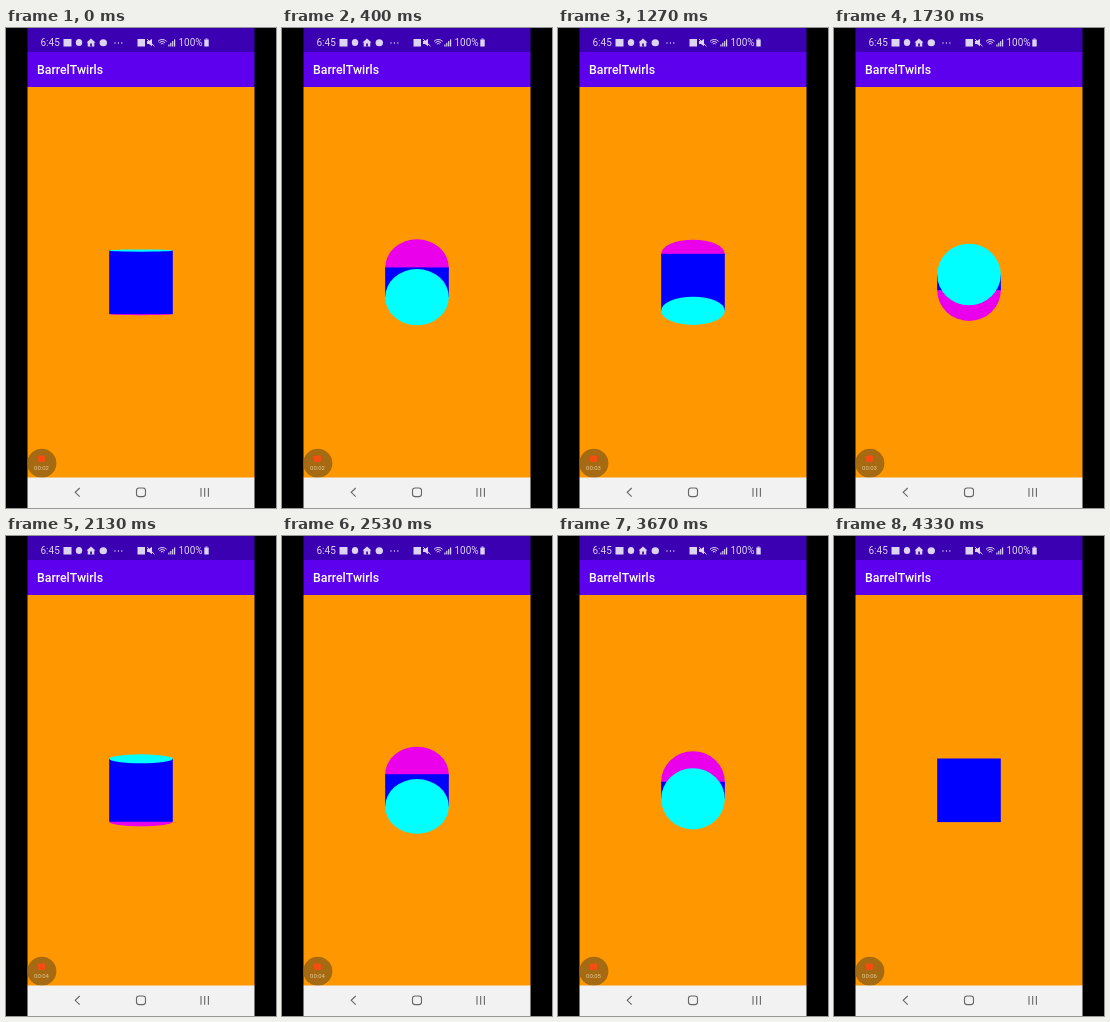
An HTML page with a canvas that plays this animation: 270x480 px, repeating every 4.39 s.

```html
<!DOCTYPE html>
<html lang="en">
<head>
<meta charset="utf-8">
<title>Spinning cylinder</title>
<style>
  html, body { margin: 0; width: 100%; height: 100%; overflow: hidden; background: #000; }
  canvas { display: block; width: 270px; height: 480px; }
</style>
</head>
<body>
<canvas id="stage"></canvas>
<script>
const W = 270, H = 480, LOOP = 4390;
const canvas = document.getElementById('stage');
const ctx = canvas.getContext('2d');
const dpr = window.devicePixelRatio || 1;
canvas.width = W * dpr;
canvas.height = H * dpr;
ctx.scale(dpr, dpr);

// Time in ms and unwrapped tilt in degrees; the turn is almost uniform.
const TILT = [
  [0, 2], [730, -115], [1730, -284.3], [2530, -419.5],
  [3200, -532.8], [3670, -614.5], [4330, -720], [4390, -730]
];

function tiltAt(t) {
  let i = 1;
  while (i < TILT.length - 1 && t > TILT[i][0]) i++;
  const [t0, a0] = TILT[i - 1], [t1, a1] = TILT[i];
  return a0 + (a1 - a0) * (t - t0) / (t1 - t0);
}

const tickStart = n => 10 * Math.round(n * 20 / 3);
function snap(t) {
  let n = Math.floor(t * 0.015) + 1;
  while (tickStart(n) > t) n--;
  return tickStart(n);
}

function rect(x, y, w, h, color) {
  ctx.fillStyle = color;
  ctx.fillRect(x, y, w, h);
}

function ellipse(x, y, rx, ry, color) {
  ctx.fillStyle = color;
  ctx.beginPath();
  ctx.ellipse(x, y, rx, ry, 0, 0, Math.PI * 2);
  ctx.fill();
}

function poly(points, color, closed = true) {
  ctx.beginPath();
  points.forEach(([x, y]) => ctx.lineTo(x, y));
  if (closed) {
    ctx.fillStyle = color;
    ctx.fill();
  } else {
    ctx.strokeStyle = color;
    ctx.stroke();
  }
}

function text(str, x, y, font, color, align = 'left') {
  ctx.font = font + ' Roboto, "Noto Sans", sans-serif';
  ctx.fillStyle = color;
  ctx.textAlign = align;
  ctx.fillText(str, x, y);
}

function statusBar() {
  const ink = '#ddd3f2', bar = '#3a00b2';
  rect(21.5, 0, 227, 24, bar);
  text('6:45', 34.5, 18.3, '10px', ink);
  rect(57.5, 11, 8, 7.5, ink);
  ellipse(73, 14.5, 3.2, 3.6, ink);
  poly([[80.5, 14.5], [85, 10.5], [89.5, 14.5], [88.3, 14.5], [88.3, 18.5], [81.7, 18.5], [81.7, 14.5]], ink);
  rect(84.2, 15.5, 1.7, 3, bar);
  ellipse(97.3, 14.7, 3.7, 3.5, ink);
  for (let i = 0; i < 3; i++) ellipse(109 + i * 3.4, 15, 0.7, 0.7, ink);

  rect(131.5, 11, 7.5, 7.5, ink);
  poly([[141, 13], [143, 13], [146, 10.7], [146, 18.3], [143, 16], [141, 16]], ink);
  ctx.lineWidth = 1;
  poly([[141, 11], [148.5, 18.3]], ink, false);
  ctx.strokeStyle = ink;
  for (let r = 2; r < 7; r += 2) {
    ctx.beginPath();
    ctx.arc(156.3, 17.5, r, -Math.PI * 0.76, -Math.PI * 0.24);
    ctx.stroke();
  }
  for (let i = 0; i < 4; i++) rect(162.3 + i * 1.9, 16.5 - i * 1.7, 1.2, 2 + i * 1.7, ink);
  text('100%', 172.5, 18.3, '10px', ink);
  rect(198.3, 11.5, 4.4, 7, ink);
  rect(199.5, 10.5, 2, 1, ink);
}

function navBar() {
  const ink = '#666';
  rect(21.5, 449.5, 227, 30.5, '#f1f2f1');
  ctx.lineWidth = 1.1;
  poly([[73.7, 460], [69.2, 464.3], [73.7, 468.6]], ink, false);
  ctx.beginPath();
  ctx.roundRect(130.5, 460, 9, 8.6, 2.6);
  ctx.stroke();
  for (let x = 195; x < 204; x += 3.7) poly([[x, 460], [x, 468.8]], ink, false);
}

function recorder(t) {
  const sec = 2 + Math.floor((t + 130) / 1000);
  ctx.save();
  ctx.beginPath();
  ctx.rect(21.5, 415, 40, 40);
  ctx.clip();
  ellipse(35.8, 435.3, 14.6, 14.6, '#a66b12');
  ctx.restore();
  ctx.fillStyle = '#f84c10';
  ctx.beginPath();
  ctx.roundRect(32, 427.5, 7, 6.5, 1.5);
  ctx.fill();
  text('00:0' + sec, 35.5, 441.8, '6px', '#e4c894', 'center');
}

// Whichever cap faces the viewer is cyan, so the pose repeats every half turn.
function cylinder(t) {
  const cx = 135, cy = 254.3, r = 31.8;
  const a = ((tiltAt(t) % 180 + 180) % 180) * Math.PI / 180;
  const shift = r * Math.cos(a), ry = r * Math.sin(a);
  ellipse(cx, cy + shift, r, ry, '#ea00ea');
  rect(cx - r, cy - Math.abs(shift), 2 * r, 2 * Math.abs(shift), '#00f');
  ellipse(cx, cy - shift, r, ry, '#0ff');
}

function draw(t) {
  rect(0, 0, W, H, '#000');
  rect(21.5, 59, 227, 391, '#ff9800');
  rect(21.5, 24, 227, 35, '#5d00ed');
  statusBar();
  text('BarrelTwirls', 31, 46, '500 12.3px', '#fff');
  cylinder(t);
  recorder(t);
  navBar();
}

const began = performance.now();
function loop() {
  draw(snap((performance.now() - began) % LOOP));
  requestAnimationFrame(loop);
}
loop();
</script>
</body>
</html>
```
